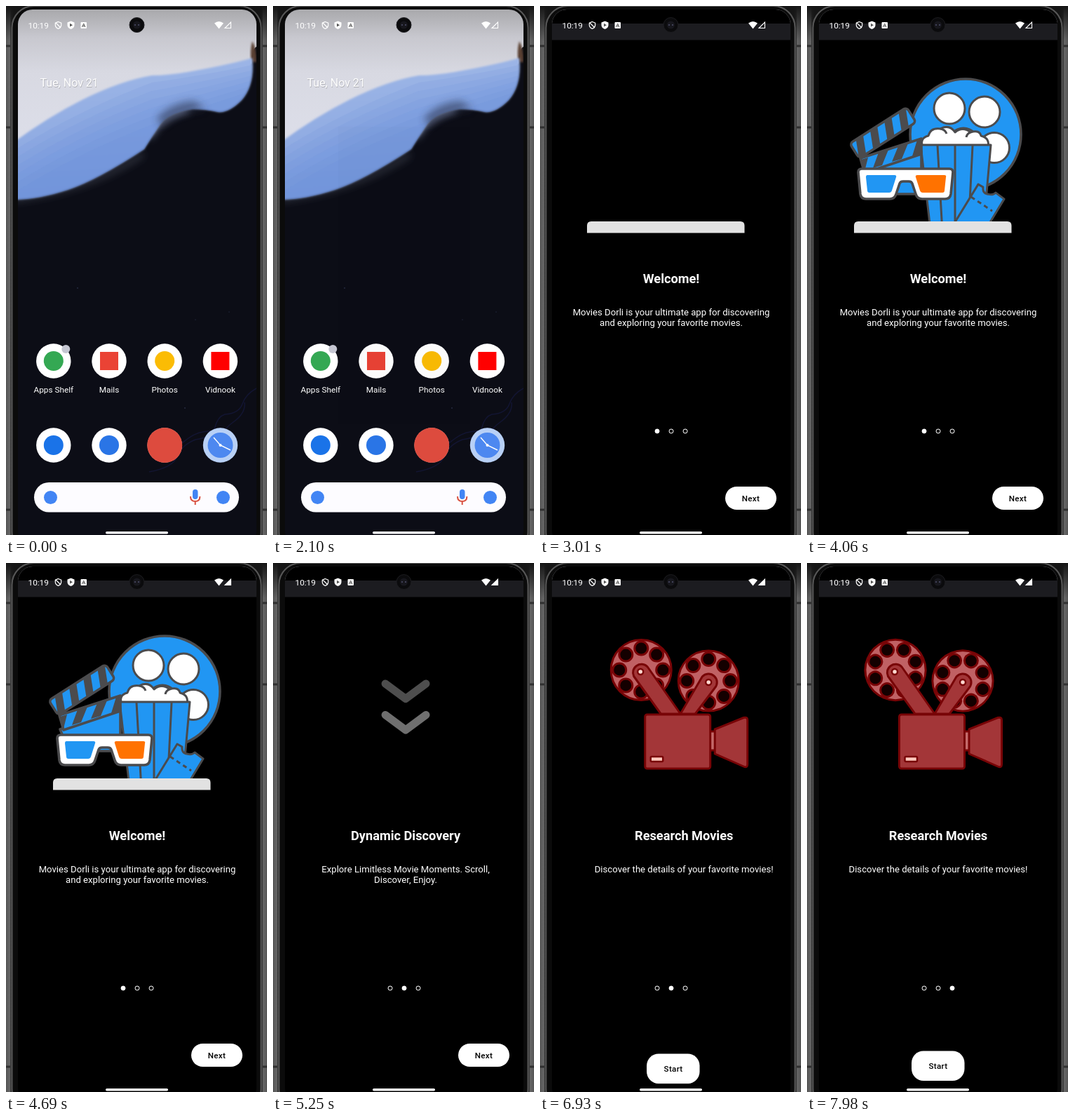
An HTML page that plays this animation: 372x754 px, repeating every 8000 ms.

```html
<!DOCTYPE html>
<html lang="en">
<head>
<meta charset="utf-8">
<title>Movie app onboarding</title>
<style>
html, body { margin: 0; width: 100%; height: 100%; overflow: hidden; background: #000; }
svg { display: block; width: 100%; height: 100%; font-family: Roboto, sans-serif; }
.mid { text-anchor: middle; }
.title { font-size: 18.2px; font-weight: 700; }
.body { font-size: 13.15px; }
.btn { font-size: 11.6px; font-weight: 500; letter-spacing: .3px; fill: #000; }
.label { font-size: 11.8px; }
.ink { stroke: #4b4b4d; stroke-width: 3.6; stroke-linejoin: round; }
.red { stroke: #780406; stroke-width: 3; stroke-linejoin: round; }
</style>
</head>
<body>
<svg viewBox="0 0 372 754" fill="#fff">
  <defs>
    <clipPath id="screen"><rect x="17" y="5" width="340" height="764" rx="21"/></clipPath>
    <clipPath id="shelf"><rect x="17" y="40" width="340" height="268"/></clipPath>
    <clipPath id="foot"><rect x="17" y="600" width="340" height="142"/></clipPath>
    <clipPath id="petalClip"><use href="#petal"/></clipPath>
    <filter id="soft" x="-20%" y="-20%" width="140%" height="140%"><feGaussianBlur stdDeviation="1.800"/></filter>
    <filter id="haze" x="-30%" y="-30%" width="160%" height="160%"><feGaussianBlur stdDeviation="6"/></filter>
    <linearGradient id="sky" x2="0" y2="1">
      <stop stop-color="#a9a9ac"/><stop offset=".2" stop-color="#c8c8cf"/><stop offset=".45" stop-color="#d8d9e2"/><stop offset="1" stop-color="#dddfea"/>
    </linearGradient>
    <linearGradient id="blue" x1=".4" x2=".5" y2="1">
      <stop stop-color="#9db6e6"/><stop offset="1" stop-color="#86a3df"/>
    </linearGradient>
    <linearGradient id="edgeL">
      <stop stop-color="#555"/><stop offset=".3" stop-color="#686868"/><stop offset=".38" stop-color="#303030"/>
      <stop offset=".6" stop-color="#151515"/><stop offset="1" stop-color="#070707"/>
    </linearGradient>
    <linearGradient id="edgeR" href="#edgeL" x1="1" x2="0"/>
    <linearGradient id="topShade" x2="0" y2="1"><stop stop-color="#161616"/><stop offset="1" stop-color="#161616" stop-opacity="0"/></linearGradient>
  </defs>

  <rect width="372" height="754" fill="#0a0a0a"/>
  <rect width="18" height="754" fill="url(#edgeL)"/>
  <rect x="354" width="18" height="754" fill="url(#edgeR)"/>
  <path d="M0 57h6M0 173h6M0 718h6M366 57h6M366 173h6M366 718h6" stroke="#303030" stroke-width="3"/>
  <rect width="372" height="50" fill="url(#topShade)"/>
  <rect x="8.500" y="0" width="355" height="780" rx="31" fill="#0b0b0b" stroke="#585858" stroke-width="2"/>

  <g clip-path="url(#screen)">
    <g id="home">
      <rect x="17" y="5" width="340" height="749" fill="#0c0d16"/>
      <path d="M17 5H357V58Q350 62 350 82Q280 105 210 110Q90 130 17 205Z" fill="url(#sky)"/>
      <path d="M351 50Q357 60 357 80H350Q347 66 351 50Z" fill="#5a4030" filter="url(#soft)"/>
      <path d="M205 190Q220 160 262 150L240 125L195 170Z" fill="#7c88a8" filter="url(#haze)"/>
      <path d="M10 276Q120 262 195 211" fill="none" stroke="#4a4f5c" stroke-width="4" filter="url(#haze)"/>
      <path id="petal" d="M10 195Q60 158 110 133Q165 106 208 99Q235 99 270 92Q320 83 351 74Q355 112 336 134Q317 153 302 151Q285 147 266 147Q234 151 220 168Q208 186 197 204Q130 248 88 262Q45 276 10 276Z" fill="url(#blue)" filter="url(#soft)"/>
      <g id="bands" clip-path="url(#petalClip)" fill="#5f84d2" opacity=".85"></g>
      <path d="M222 172Q240 150 285 147L268 136Q236 138 216 160Z" fill="#2c3248" opacity=".65" filter="url(#haze)"/>
      <path d="M357 545q-15 8-20 22t-25 15q-10 3-14 18t-28 18q-20 8-26 24t-40 22M340 565q2 15-16 28t-20 30M300 606q-24-2-40 10t-40 32" fill="none" stroke="#191c4a" stroke-width="1.500" opacity=".55"/>
      <g fill="#39405e"><circle cx="102" cy="402" r=".8"/><circle cx="255" cy="573" r=".8"/><circle cx="270" cy="447" r=".6"/><circle cx="318" cy="436" r=".6"/></g>
      <text x="49" y="116" font-size="16" fill="#555" opacity=".35">Tue, Nov 21</text>
      <text x="48.500" y="115" font-size="16">Tue, Nov 21</text>
      <g id="apps"></g>
      <rect x="40" y="679" width="292" height="42.500" rx="21.200" fill="#fdfcff"/>
      <circle cx="63.500" cy="700.500" r="9.500" fill="#4285f4"/>
      <rect x="266" y="689" width="7.500" height="14" rx="3.700" fill="#4285f4"/>
      <path d="M263 699q0 7 6.700 7t6.700-7M269.700 706v5" fill="none" stroke="#d9503f" stroke-width="2"/>
      <circle cx="309.500" cy="700.500" r="9.500" fill="#4285f4"/>
    </g>

    <g id="app">
      <rect x="17" y="5" width="340" height="765" fill="#000"/>
      <g id="content">
        <rect x="17" y="25" width="340" height="23.500" fill="#1c1c20"/>
        <g class="page">
          <g id="show" clip-path="url(#shelf)" class="ink">
            <g><circle cx="226" cy="183" r="79" fill="#2196f3"/>
              <g stroke-width="3"><circle cx="203" cy="146" r="22"/><circle cx="253" cy="151" r="22"/><circle cx="267" cy="202" r="21.500"/><circle cx="223" cy="195" r="21"/></g></g>
            <g stroke-width="3"><path d="M165 202Q160 188 173 185Q176 173 190 175Q203 168 211 180Q222 171 233 180Q246 176 248 185Q261 188 258 202Z"/>
              <path d="M190 175Q197 176 199 182M233 180Q228 182 227 187" fill="none"/>
              <path d="M162 198H262L249 345H179Z" fill="#2196f3"/>
              <path d="M186 199L194 340M211 199V340M236 199L229 340" fill="none"/></g>
            <g><path d="M77 237L163 208V268H90Z" fill="#2196f3"/>
              <g id="arm" fill="#2196f3"></g>
              <path d="M76 217L163 189V211L82 238Z" fill="#2196f3"/>
              <path d="M77 219l10-3-5 20zM102 209l14-4-9 22-13 4zM130 200l14-4-9 22-14 4zM157 191l6-1v20l-13 4z" fill="#4b4b4d" stroke="none"/></g>
            <g><path d="M206 320L244 258L251 262Q250 271 258 272Q265 274 269 270L281 279L255 322Z" fill="#2196f3" stroke-width="3"/>
              <path d="M234 276l30 20" stroke-dasharray="6 5" stroke-width="3"/></g>
            <g><path d="M78 245H203Q208 245 208 250L205 281Q204 288 197 288H164Q157 288 155 281L150 266Q149 263 145 263H137Q133 263 132 266L127 281Q125 288 118 288H84Q77 288 76 281L73 250Q73 245 78 245Z"/>
              <g stroke="none"><path d="M86 254H125Q128 254 127 257L121 276Q120 279 117 279H89Q86 279 86 276L84 257Q84 254 86 254Z" fill="#2196f3"/>
              <path d="M157 254H196Q199 254 198 257L196 276Q196 279 193 279H165Q162 279 161 276L155 257Q154 254 157 254Z" fill="#ff7200"/></g></g>
          </g>
          <path d="M67 323.500V313Q67 307 73 307H285.500Q291.500 307 291.500 313V323.500Z" fill="#e2e2e2"/>
          <g class="mid"><text class="title" x="187" y="394.500">Welcome!</text>
          <text class="body" x="187" y="440.500">Movies Dorli is your ultimate app for discovering</text>
          <text class="body" x="187" y="456">and exploring your favorite movies.</text></g>
        </g>
        <g class="page">
          <g fill="none" stroke="#fff" stroke-width="11" stroke-linecap="round" stroke-linejoin="round">
            <path class="chev" d="M158 172L187 193.500L216 172"/><path class="chev" d="M158 216.500L187 238L216 216.500"/>
          </g>
          <g class="mid"><text class="title" x="187" y="394.500">Dynamic Discovery</text>
          <text class="body" x="187" y="440.500">Explore Limitless Movie Moments. Scroll,</text>
          <text class="body" x="187" y="456">Discover, Enjoy.</text></g>
        </g>
        <g class="page">
          <g class="red">
            <g class="reel"></g><g class="reel"></g>
            <path d="M115.500 161.500A12 12 0 0 1 135 148L182 215H154Z" fill="#a33638"/>
            <path d="M182 215L213 162A12 12 0 0 1 231 178L203 215Z" fill="#a33638"/>
            <g fill="#ffd9d0" stroke-width="2.500"><circle cx="125" cy="155" r="4"/><circle cx="222" cy="170" r="4"/></g>
            <rect x="223" y="240" width="9" height="27" fill="#c46a6a"/>
            <path d="M231 237L272 220.500Q277.500 219 277.500 224V287Q277.500 292.500 272 290L231 272Z" fill="#a33638"/>
            <rect x="131.500" y="216" width="93" height="77" rx="3" fill="#a33638"/>
            <rect x="139.500" y="276" width="17.500" height="7" rx="1.500" fill="#ffc9bd" stroke-width="2.500"/>
          </g>
          <g class="mid"><text class="title" x="187" y="394.500">Research Movies</text>
          <text class="body" x="187" y="440.500">Discover the details of your favorite movies!</text></g>
        </g>
        <g id="dots" stroke="#fff" stroke-width="1"></g>
        <g id="next" class="mid"><rect x="264" y="685" width="73" height="33" rx="16.500"/><text class="btn" x="300.500" y="706">Next</text></g>
        <g clip-path="url(#foot)"><g id="start" class="mid"><rect x="149" y="695.500" width="75.500" height="42.500" rx="17"/><text class="btn" x="187" y="721">Start</text></g></g>
        <path id="cursor" d="M315 700.500V715.500L318.400 712.500L320.800 718L323.200 717L320.800 711.800H325.300Z" fill="#111" stroke="#fff" stroke-width=".9"/>
      </g>
    </g>

    <text x="31.500" y="31.500" font-size="11.800">10:19</text>
    <path d="M74.500 22.500l4.200 1.600v3q0 3.800-4.200 5.300-4.200-1.500-4.200-5.300v-3zM71 24l7 7" fill="none" stroke="#fff" stroke-width="1.200"/>
    <path d="M92.500 21.600l5 1.900v3.500q0 4.400-5 6-5-1.600-5-6v-3.500z"/><path d="M91 24.800l4 2.400-4 2.400z" fill="#555"/>
    <rect x="106.500" y="23" width="8.500" height="9" rx="1"/><path d="M108.500 30l2.200-5 2.200 5M109.200 28.500h3" fill="none" stroke="#555"/>
    <path d="M297 24.500Q303.500 19.500 310 24.500L303.500 32.500Z"/>
    <path id="signal" d="M320.500 23V31.500H312Z" stroke="#fff" stroke-width="1.100"/>
    <circle cx="186.500" cy="27" r="10.500" fill="#0b0b0d" stroke="#1d1d20"/>
    <circle cx="186.500" cy="27" r="5.500" fill="#17171d"/>
    <circle cx="184" cy="27" r="1.100" fill="#4b4c66"/><circle cx="189" cy="27" r="1.100" fill="#4b4c66"/>
    <rect x="142" y="749" width="89" height="3.500" rx="1.700"/>
  </g>
</svg>
<script>
const LOOP = 8000;
const $ = id => document.getElementById(id);
const all = sel => [...document.querySelectorAll(sel)];
const clamp = x => Math.max(0, Math.min(1, x));
const ramp = (t, from, to) => clamp((t - from) / (to - from));
const easeOut = x => 1 - (1 - x) ** 3;
const backOut = x => 1 + 3 * (x - 1) ** 3 + 2 * (x - 1) ** 2;
// Critically damped spring from 0 to 1, t in ms
const spring = t => t <= 0 ? 0 : 1 - (1 + t / 50) * Math.exp(-t / 50);
const move = (el, x, y) => el.setAttribute('transform', `translate(${x} ${y})`);
const fade = (el, o) => el.setAttribute('opacity', o);
const show = (el, on) => el.setAttribute('visibility', on ? 'visible' : 'hidden');

const disc = (x, y, r, fill) => `<circle cx="${x}" cy="${y}" r="${r}" fill="${fill}"/>`;
const square = (x, y, s, fill) => `<rect x="${x - s / 2}" y="${y - s / 2}" width="${s}" height="${s}" fill="${fill}"/>`;

function buildHome() {
  // Stacked translucent layers darken the petal towards its lower edge
  let bands = '';
  for (let i = 0; i < 6; i++) {
    const y = i * 12;
    bands += `<path d="M10 ${207 + y}Q100 ${150 + y} 208 ${109 + y}Q290 ${98 + y * .7} 360 ${82 + y * .6}V300H10Z" opacity=".12"/>`;
  }
  $('bands').innerHTML = bands;

  const names = ['Apps Shelf', 'Mails', 'Photos', 'Vidnook'];
  const marks = [
    [disc, 28, '#34a853'], [square, 26, '#ea4335'], [disc, 28, '#fbbc04'], [square, 26, '#ff0000'],
    [disc, 28, '#1a73e8'], [disc, 28, '#2a75e6'], [disc, 50, '#dd4b3e']
  ];
  let apps = '';
  marks.forEach(([shape, size, fill], i) => {
    const x = 67.8 + 79.2 * (i % 4), y = i < 4 ? 506 : 626;
    apps += disc(x, y, 24.7, '#fff') + shape(x, y, shape === disc ? size / 2 : size, fill);
    if (i < 4) apps += `<text class="label mid" x="${x}" y="551">${names[i]}</text>`;
  });
  apps += disc(85.3, 489, 6, '#c5c6d2') + disc(305.5, 626, 24.7, '#b8d0f6') + disc(305.5, 626, 18, '#4d88f0');
  apps += '<path d="M296 615L305.500 626L320 633" fill="none" stroke="#fff" stroke-width="1.400"/>' + disc(305.5, 626, 2, '#fff');
  $('apps').innerHTML = apps;
}

function buildPages() {
  let arm = '<g transform="translate(61 196) rotate(-32.500)"><rect width="96" height="25" rx="5"/><g fill="#4b4b4d" stroke="none">';
  for (let x = 10; x < 90; x += 24) arm += `<path d="M${x} 1h12l-10 23h-12z"/>`;
  $('arm').innerHTML = arm + '</g></g>';

  all('.reel').forEach(reel => {
    let holes = disc(0, 0, 43, '#c06164');
    for (let i = 0; i < 8; i++) {
      const a = i * Math.PI / 4;
      holes += disc(31 * Math.cos(a), 31 * Math.sin(a), 9.5, '#140000');
    }
    reel.innerHTML = holes;
  });
  $('dots').innerHTML = [167, 187, 207].map(x => disc(x, 606, 3, 'none')).join('');
}

buildHome();
buildPages();
const pages = all('.page'), chevs = all('.chev'), reels = all('.reel');
const props = [...$('show').children], dots = [...$('dots').children];

function draw(t) {
  const open = easeOut(ramp(t, 2100, 2500));
  const s = .55 + .45 * open;
  show($('app'), open > 0);
  fade($('app'), clamp(open * 1.6));
  $('app').setAttribute('transform', `translate(187 380) scale(${s}) translate(-187 -380)`);
  fade($('content'), ramp(t, 2610, 3000));

  const toThird = spring(t - 6698);
  const pos = spring(t - 4890) + toThird;
  pages.forEach((page, i) => {
    move(page, 340 * (i - pos), 0);
    // Inherit when on, so the hidden app window hides its pages too
    page.setAttribute('display', Math.abs(i - pos) < 1 ? 'inline' : 'none');
  });

  props.forEach((prop, i) => {
    const k = ramp(t, 3400 + i * 55, 3950 + i * 55);
    move(prop, 0, 235 * (1 - backOut(k)));
    prop.setAttribute('display', k > 0 ? 'inline' : 'none');
  });

  chevs.forEach((chev, i) => fade(chev, .65 + .35 * Math.cos((t - 5993 - i * 160) * Math.PI / 700)));

  const turn = (t - 6930) * 67.5 / 1050;
  reels.forEach((reel, i) =>
    reel.setAttribute('transform', `translate(${i ? 222 : 126} ${i ? 168 : 152.5}) rotate(${turn})`));

  const current = t < 5220 ? 0 : t < 7030 ? 1 : 2;
  dots.forEach((dot, i) => dot.setAttribute('fill', i === current ? '#fff' : 'none'));

  fade($('next'), 1 - ramp(t, 6700, 6850));
  fade($('start'), clamp(toThird * 1.1));
  move($('start'), 57 * (1 - toThird), 75 * (1 - toThird));
  show($('cursor'), (t >= 4760 && t < 5180) || (t >= 6090 && t < 6790));
  $('signal').setAttribute('fill', t < 4270 ? 'none' : '#fff');
}

function frame() {
  draw(performance.now() % LOOP);
  requestAnimationFrame(frame);
}
frame();
</script>
</body>
</html>
```
